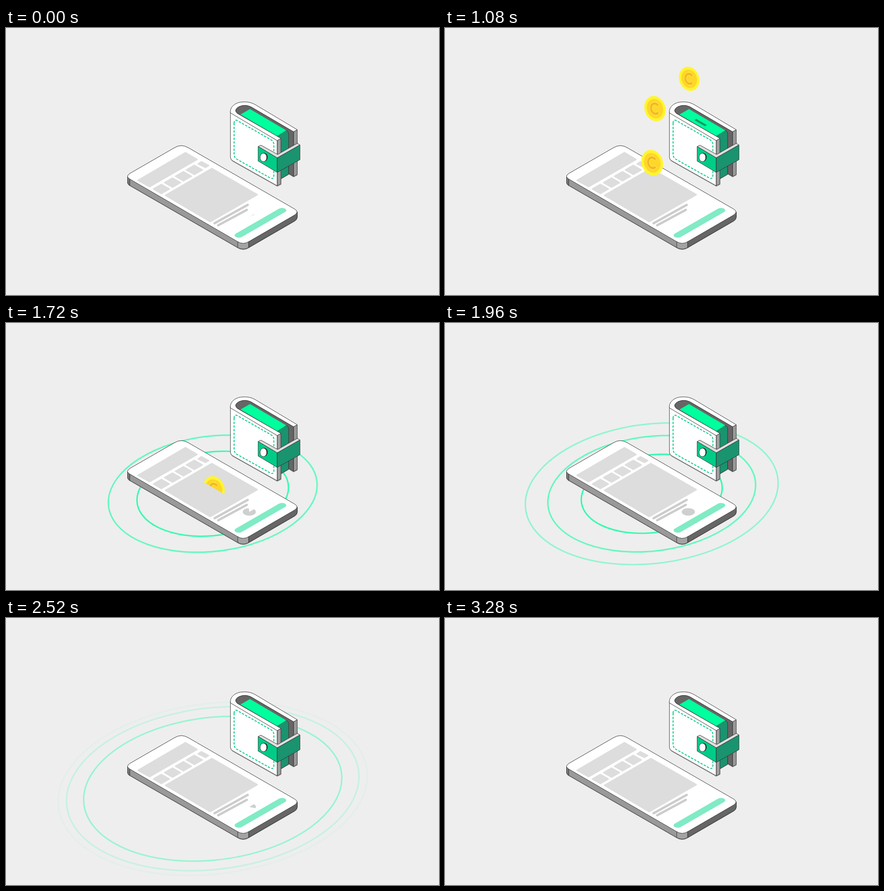
Recreate the animation shown at these times as an HTML page. Size 953 by 588 pixels, loop 3400 ms.

```html
<!DOCTYPE html>
<html lang="en">
<head>
<meta charset="utf-8">
<title>Coins from wallet to phone</title>
<style>
  html, body { margin: 0; width: 100%; height: 100%; overflow: hidden; background: #eee; }
  svg { display: block; width: 100%; height: 100%; }

  .line { stroke: #333; stroke-width: 1; stroke-linejoin: round; }
  .coin, .tail, .ring, .pie, .slot { animation: 3400ms linear infinite both; }
  .coin { animation-name: fly; }
  .tail { animation-name: tail; }
  .pie { animation-name: fill; }
  .slot { animation-name: slot; transform-box: fill-box; transform-origin: center; }
  .ring { animation-name: grow, fade; vector-effect: non-scaling-stroke; }

  .coin.b, .tail.b { animation-delay: 220ms; }
  .coin.c, .tail.c { animation-delay: 440ms; }
  .ring.b { animation-delay: 245ms; }
  .ring.c { animation-delay: 525ms; }

  @keyframes fly {
    0%, 7.06% { transform: translate(565px, 246px) scale(.93); }
    9.41%  { transform: translate(565px, 225.5px) scale(.93); }
    11.76% { transform: translate(565px, 200px) scale(.93); }
    14.12% { transform: translate(563px, 168px) scale(.93); }
    15.88% { transform: translate(557.5px, 142.5px) scale(.93); }
    17.35% { transform: translate(550px, 124px) scale(.93); }
    18.82% { transform: translate(538px, 112px) scale(.935); }
    20%    { transform: translate(521px, 109px) scale(.94); }
    21.18% { transform: translate(500px, 113px) scale(.945); }
    22.35% { transform: translate(481.5px, 126.5px) scale(.955); }
    24.12% { transform: translate(467px, 155px) scale(.97); }
    25.88% { transform: translate(460px, 188px) scale(.985); }
    28.24% { transform: translate(457px, 231.5px) scale(1); }
    31.18% { transform: translate(456px, 286px) scale(1); }
    32.94% { transform: translate(456px, 317px) scale(1); }
    34.71% { transform: translate(456px, 341px) scale(1); }
    36.18% { transform: translate(457px, 355px) scale(1); }
    37.65% { transform: translate(457.5px, 365.5px) scale(1); }
    41.18%, 100% { transform: translate(458px, 398px) scale(1); }
  }
  @keyframes tail {
    0%, 34% { opacity: 0; }
    34.01%, 36.5% { opacity: 1; }
    36.51%, 100% { opacity: 0; }
  }
  /* quadratic ease-out */
  @keyframes grow {
    0%, 29.03% { r: 0px; animation-timing-function: cubic-bezier(.333, .667, .667, 1); }
    80.2%, 100% { r: 345px; }
  }
  @keyframes fade {
    0%, 29.03% { opacity: 0; }
    29.04%, 37% { opacity: 1; }
    50.59% { opacity: .62; }
    64.7% { opacity: .22; }
    76.5%, 100% { opacity: 0; }
  }
  @keyframes slot {
    0%, 3.53% { transform: scale(0); }
    7.65%, 29.5% { transform: scale(1); }
    33.6%, 100% { transform: scale(0); }
  }
  @keyframes fill {
    0%, 3.53% { stroke-dasharray: 6 400; }
    21.8%, 30% { stroke-dasharray: 361 400; }
    30.01%, 32.35% { stroke-dasharray: 0 400; }
    41.18% { stroke-dasharray: 150 400; }
    50.59% { stroke-dasharray: 310 400; }
    53.5%, 62% { stroke-dasharray: 361 400; }
    62.01%, 68.8% { stroke-dasharray: 0 400; }
    74.12% { stroke-dasharray: 64 400; }
    88.24%, 96.46% { stroke-dasharray: 361 400; }
    96.47%, 100% { stroke-dasharray: 0 400; }
  }
</style>
</head>
<body>
<svg viewBox="0 0 953 588">
  <defs>
    <!-- hides coins below the wallet slot and below the phone screen -->
    <clipPath id="above">
      <path d="M0 0H953V434L510 185V394L0 99Z"/>
    </clipPath>
    <g id="coin" transform="matrix(.98 .15 0 1.15 0 0)">
      <circle r="24.5" fill="#fff52e"/>
      <circle r="18.8" fill="#ffd62a"/>
      <g fill="none">
        <path d="M-1 -15V-9M3 -15V-9M-1 15V9M3 15V9" stroke="#ffee3a" stroke-width="1.4"/>
        <path d="M8 -6A9.5 10 0 1 0 8 6" stroke="#ffee3a" stroke-width="6.4"/>
        <path d="M7.4 -6.6A9.5 10 0 1 0 7.4 6.6" stroke="#f2b62c" stroke-width="4.4"/>
      </g>
    </g>
    <path id="tail" d="M456 362.4L477.5 375.5Q475 369 470 363Z" fill="#fff52e"/>
    <path id="body" d="M267.5 327V340Q267.5 344 273 347L509 483Q522 491 535 483L635 425Q641 421 641 417V405L522 440Z"/>
  </defs>

  <rect width="953" height="588" fill="#eee"/>

  <g transform="matrix(1 -.0836 0 .555 455 376)" fill="none" stroke="#00ff9d" stroke-width="3">
    <circle class="ring" r="0"/>
    <circle class="ring b" r="0"/>
    <circle class="ring c" r="0"/>
  </g>

  <!-- phone -->
  <use href="#body" y="1.5" fill="#aaa"/>
  <use href="#body" class="line" fill="#999"/>
  <path d="M267.5 327V340Q267.5 344 272.5 347V330Z" fill="#777" class="line"/>
  <path d="M534 468V483.5L635 425Q641 421 641 417V405Z" fill="#666" class="line"/>
  <path d="M510 468V483.5Q522 490.5 534 483.5V468Z" fill="#a3a3a3" class="line"/>
  <path class="line" fill="#fff" d="M273 333Q262 327 273 320L371 263.5Q386 254.5 401 263.5L635 398.5Q646 405 635 412L535 470Q522 478.5 509 470Z"/>
  <g fill="#ddd" stroke="#ddd" stroke-width="3" stroke-linejoin="round">
    <path d="M290.5 335.5L395 274.5L420.5 289.5L316 349.5Z"/>
    <path id="tile" d="M324.5 354.5L342 344.5L359.5 354.5L342 364.5Z"/>
    <use href="#tile" x="24.5" y="-14"/>
    <use href="#tile" x="48.5" y="-28"/>
    <use href="#tile" x="72.5" y="-42"/>
    <path d="M423 299.5L430 294.5L446 303L439 307Z"/>
    <path d="M351 368.5L453 309.5L553 367L449.5 426.5Z"/>
  </g>
  <path d="M459 430L532 389.5M467 434.5L530 400.5" stroke="#ccc" stroke-width="5" stroke-linecap="round"/>
  <path transform="matrix(.866 -.5 .866 .5 560 429)" d="M-55 0H55" stroke="#80ebc4" stroke-width="15" stroke-linecap="round"/>
  <circle class="pie" transform="matrix(.866 -.5 .866 .5 535.5 416)" r="5.9" pathLength="360" fill="none" stroke="#cfcfcf" stroke-width="11.8"/>

  <!-- wallet -->
  <path d="M494 284V286Q494 292 501 295.5L597 349.5L606 345V333L623 323L633 329L641.5 324.5V250Z" fill="#aaa"/>
  <path class="line" fill="#666" d="M509 188Q500 180 513 173Q527 167 540 174L633 228.5V327L622 320.5V300L597 240Z"/>
  <path class="line" fill="#999" d="M633 228.5L641 224V323L633 327Z"/>
  <path class="line" fill="#1a936f" d="M597 238L617 225.5Q622 228 622 234V322L605 332H597Z"/>
  <path fill="#00ff9d" d="M516 190.5L537 178.5L617 225.5L597 238Z"/>
  <path class="slot" fill="#0f9a68" d="M541 190L594 220.5L584 226.5L531 196Z"/>
  <path class="line" fill="#fff" d="M494 184V285Q494 290 500 293L597 347.5V248Z"/>
  <path class="line" fill="#a0a0a0" d="M597 248L605 243V343.5L597 347.5Z"/>
  <path class="line" fill="#fff" d="M494 187C492 172 508 163 520 163C532 162 540 164 549 169L641 224L633 228.5L540 174Q527 167 513 173Q500 180 509 188L605 243L597 248Z"/>
  <path d="M502 210Q502 200 510 204.5L583 246Q589.5 250 589.5 256V325Q589.5 334 582 330.5L508 289Q502 285 502 279Z" fill="none" stroke="#00cc88" stroke-width="2" stroke-dasharray="5 3"/>
  <path class="line" fill="#ddd" d="M555 261L561 258L598 278.5L641 254L647 257.5L597 286Z"/>
  <path class="line" fill="#00cc88" d="M555 261L597 286V318L555 293Z"/>
  <path class="line" fill="#1a936f" d="M597 286L647 257.5V290L597 318Z"/>
  <ellipse cx="568.5" cy="284.5" rx="7.5" ry="9.5" fill="#333"/>
  <ellipse class="line" cx="566.5" cy="285" rx="7.3" ry="9.3" fill="#fff"/>

  <g clip-path="url(#above)">
    <use href="#tail" class="tail"/>
    <use href="#tail" class="tail b"/>
    <use href="#tail" class="tail c"/>
    <g class="coin"><use href="#coin"/></g>
    <g class="coin b"><use href="#coin"/></g>
    <g class="coin c"><use href="#coin"/></g>
  </g>
</svg>
</body>
</html>
```
